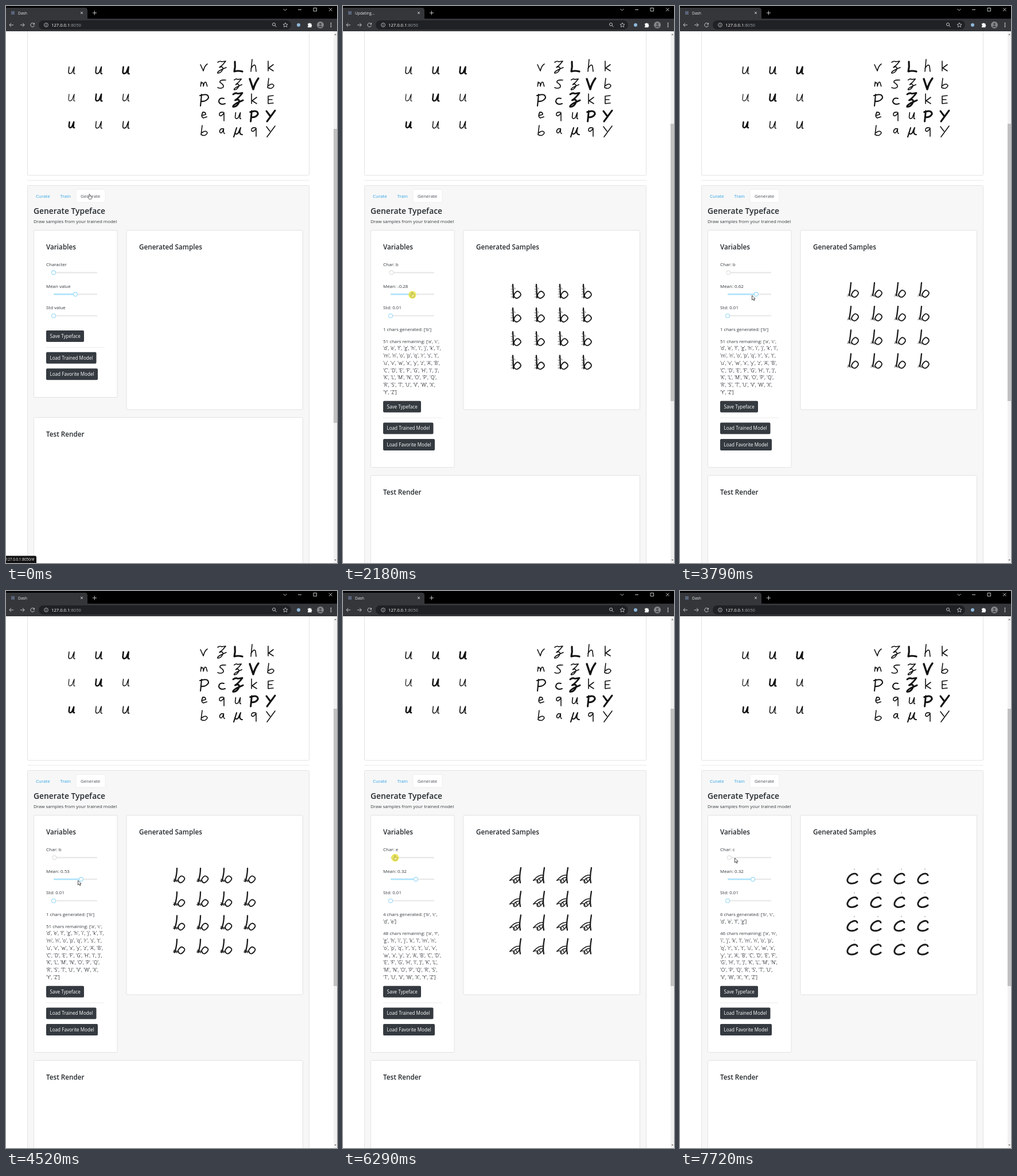
Animation, 577 px wide and 970 px high, one loop 8 s. Source, as an HTML page:

```html
<!DOCTYPE html>
<html lang="en">
<head>
<meta charset="utf-8">
<title>Generate Typeface</title>
<style>
html,body{margin:0;width:100%;height:100%;overflow:hidden;background:#fff}
svg{display:block;width:577px;height:970px;font-family:"Open Sans","Noto Sans",sans-serif}
text{font-size:7.95px;fill:#33383c;white-space:pre}
.h{font-size:11.7px;font-weight:600;fill:#24292d}
.b{font-size:8.12px;fill:#fff}
.row{font-size:8.3px}
.ink path{fill:none;stroke-linecap:round;stroke-linejoin:round}
.card{fill:#fff;stroke:#e2e2e2}
.ui{fill:none;stroke:#d4d6d9;stroke-width:.9}
</style>
</head>
<body>
<svg id="stage" viewBox="0 0 577 970"></svg>
<script>
const LOOP = 8000, LINE = 12.7;
const stage = document.getElementById('stage');
const $ = id => document.getElementById(id);
const text = (x, y, s, extra = '') => `<text x="${x}" y="${y}" ${extra}>${s}</text>`;
const rect = (x, y, w, h, extra) => `<rect x="${x}" y="${y}" width="${w}" height="${h}" ${extra}/>`;
const path = (d, extra = '') => `<path d="${d}" ${extra}/>`;
const mark = (x, y, d, w, s = 1) =>
  path(d, `transform="translate(${x} ${y}) scale(${s})" stroke="#111" stroke-width="${w / s}"`);

// Handwritten letters, drawn around their own centre
const pen = {
  v: 'M-6,-4L-1,7Q1,-2 6,-5',
  z: 'M-7,-8Q-3,-11 0,-9L7,-10Q2,-3 -4,1Q3,-2 2,4Q-1,11 -7,11Q-9,8 8,1',
  L: 'M-5,-9Q-4,0 -6,8Q0,6 8,8',
  h: 'M-3,-13L-5,8M-5,3Q1,-7 3,-1L4,8',
  k: 'M-4,-10L-4,7M5,-4L-3,2 5,7',
  m: 'M-6,4L-5,-4M-5,-1Q-1,-6 -1,4Q1,-6 4,-3L6,4',
  s: 'M7,-7Q-4,-8 -3,-3Q4,1 3,5Q-1,9 -7,6',
  V: 'M-7,-9L-1,9Q2,-2 8,-10',
  b: 'M-3,-10L-5,6Q3,10 6,3Q4,-3 -4,3',
  p: 'M-4,-9L-6,11M-7,-7Q8,-12 8,-3Q4,4 -5,3',
  c: 'M4,-2Q-5,-4 -5,4Q-2,10 6,7',
  E: 'M5,-7L-4,-6 -4,7 5,6M-4,0L3,0',
  e: 'M-4,0L3,-2Q3,-7 -2,-6Q-6,2 -1,4L5,2',
  q: 'M3,-6Q-5,-7 -4,-1Q-1,3 4,-5L4,9',
  u: 'M-4,-6L-5,3Q-4,8 1,4L5,-6L4,4Q4,6 6,6',
  a: 'M4,-5Q-5,-6 -4,2Q0,7 4,-4Q3,4 6,5',
  w: 'M-2,-6L-7,10M-5,3Q-3,7 1,3L5,-6Q1,6 8,6',
  Y: 'M-7,-8L-1,0M8,-9L-6,10'
};
const wall = ['vzLhk', 'mszVb', 'pczkE', 'equpY', 'bawqY'];
const rows = [106, 136, 163, 191, 218], cols = [345, 376, 404, 432, 461];
const bold = {'0,2': 3.2, '1,3': 3.4, '2,2': 2.8, '2,0': 2.1, '2,1': 2, '3,3': 3, '3,4': 3, '4,2': 2.1, '3,0': 1.8};
const small = {'1,0': .95, '1,2': .9, '2,2': 1.15, '3,2': .9, '3,3': .9, '4,1': .85};
function letters() {
  let s = '';
  wall.forEach((row, r) => [...row].forEach((c, i) => {
    const k = r + ',' + i;
    s += mark(cols[i], rows[r], pen[c], bold[k] || 1.6, small[k] || 1);
  }));
  [1.6, 2, 2.6, 1.2, 2.4, 1.4, 2.5, 1.5, 1.7].forEach((w, i) =>
    s += mark(114 + i % 3 * 47.3, 112 + Math.floor(i / 3) * 47.5, pen.u, w, i === 6 ? .85 : 1));
  return s;
}

function chrome() {
  return rect(0, 0, 577, 44, 'fill="#000"') +
    path('M0,22V3H138Q142,3 142,8V22Z', 'fill="#35363a"') +
    rect(0, 22, 577, 22, 'fill="#35363a"') +
    rect(57, 25, 440, 16, 'rx="8" fill="#202124"') +
    rect(9, 9, 6, 6, 'fill="#596478"') +
    text(21, 14.5, 'Dash', 'id="title" style="font-size:6.7px;fill:#e8eaed"') +
    text(79, 35.8, '127.0.0.1<tspan fill="#9aa0a6">:8050</tspan>', 'style="font-size:7.66px;fill:#fff"') +
    `<g class="ui">` +
    path('M130,10l4,4m0,-4l-4,4M151,12h7m-3.5,-3.5v7') +
    path('M483.500,5l3,3 3,-3M509,6.500h6M536,3.500h5.500v5.500h-5.500ZM563,3.500l5.500,5.500m0,-5.500l-5.500,5.500') +
    path('M13,33H6m3,-3.200l-3.200,3.200 3.200,3.200') +
    path('M25,33h7m-3,-3.200l3.200,3.200 -3.200,3.200') +
    path('M49,31A3.400,3.400 0 1 0 49.500,34M49.500,29.500v2.500h-2.500') +
    `<circle cx="70" cy="33" r="3.4" stroke-width=".8"/>` + path('M70,32.500v2.200M70,30.900v.8') +
    `<circle cx="467" cy="32" r="2.500"/>` + path('M469,34l2.500,2.500') +
    path('M487,29l1.200,2.700 2.800,.2 -2.100,1.900 .7,2.900 -2.600,-1.600 -2.600,1.600 .7,-2.900 -2.100,-1.900 2.800,-.2Z', 'stroke-width=".8"') +
    `</g><circle cx="510" cy="33" r="3" fill="#8fb9dc"/>` +
    path('M526,30.500h2a1.300,1.300 0 0 1 2.500,0h2v2.200a1.300,1.300 0 0 1 0,2.500v2h-6.500v-2a1.300,1.300 0 0 0 0,-2.500Z', 'fill="#fff"') +
    `<circle cx="548" cy="33" r="6" fill="#85878a"/><circle cx="548" cy="31.5" r="2" fill="#4a4c50"/>` +
    path('M544,37Q548,31 552,37Z', 'fill="#4a4c50"') +
    [30, 33, 36].map(y => `<circle cx="566.500" cy="${y}" r=".9" fill="#e8eaed"/>`).join('');
}

const slider = (id, y) => rect(83, y - 1.2, 76, 2.4, 'rx="1.2" fill="#e9e9e9"') +
  rect(83, y - 1.2, 0, 2.4, `id="${id}Fill" rx="1.2" fill="#abe2fb"`) +
  `<circle id="${id}Knob" cx="83" cy="${y}" r="3.4" fill="#fff" stroke="#96d8f7" stroke-width="1.1"/>`;
const button = (y, w, s) => rect(70, y, w, 20, 'rx="2" fill="#343a40"') + text(76.5, y + 13, s, 'class="b"');

stage.innerHTML = `
<defs><filter id="soft" x="-5%" y="-5%" width="110%" height="110%"><feGaussianBlur stdDeviation=".4"/></filter>
<g id="cell" class="ink"></g></defs>` +
  rect(0, 0, 577, 970, 'fill="#fff"') +
  rect(37.5, 20, 491, 275, 'rx="2" class="card"') +
  `<g class="ink">${letters()}</g><circle cx="401.500" cy="88" r=".4" fill="#999"/>` +
  rect(37, 303, 492, 1, 'fill="#ebebeb"') +
  rect(37.5, 312.5, 491, 700, 'rx="2" fill="#f7f7f7" stroke="#e4e4e4"') +
  path('M122,342V321Q122,319.500 124,319.500H171Q173,319.500 173,321.500V342Z', 'fill="#fff" stroke="#eaeaea" stroke-width=".7"') +
  text(52, 333.5, 'Curate', 'style="fill:#2fa4e7"') + text(94.5, 333.5, 'Train', 'style="fill:#2fa4e7"') +
  text(130, 333.5, 'Generate', 'style="fill:#495057"') +
  text(48, 361.5, 'Generate Typeface', 'class="h" style="font-size:13.85px"') +
  text(48, 378, 'Draw samples from your trained model') +
  rect(48.5, 390.5, 145.500, 291, 'id="vars" rx="2" class="card"') +
  rect(210, 390.5, 307.500, 312.500, 'rx="2" class="card"') +
  text(70, 424, 'Variables', 'class="h"') + text(232, 424, 'Generated Samples', 'class="h"') +
  text(70, 453, '', 'id="charText"') + slider('char', 464.3) +
  text(70, 490.6, '', 'id="meanText"') + slider('mean', 502) +
  text(70, 528, '', 'id="stdText"') + slider('std', 539.4) +
  `<g id="lists"></g><g id="actions">` + button(565, 66, 'Save Typeface') + rect(70, 594, 102, 1, 'fill="#ececec"') +
  button(602.7, 87.5, 'Load Trained Model') + button(631.3, 90, 'Load Favorite Model') + `</g>
  <g id="test">` + rect(48.5, .5, 469, 400, 'rx="2" class="card"') + text(70, 34, 'Test Render', 'class="h"') + `</g>
  <g id="grid" filter="url(#soft)">` +
  Array.from({length: 16}, (_, i) => `<use href="#cell" x="${301 + i % 4 * 41}" y="${499 + (i >> 2) * 41.2}"/>`).join('') + `</g>` +
  rect(571, 43, 6, 927, 'fill="#f1f1f1"') + rect(571, 214, 6, 512, 'id="thumb" fill="#c1c1c1"') +
  path('M572.500,50.500l1.700,-2 1.700,2ZM572.500,964l1.700,2 1.700,-2Z', 'fill="#555"') +
  `<g id="status">` + path('M0,957.500H51Q53,957.500 53,960V970H0Z', 'fill="#111"') +
  text(-.5, 966.3, '127.0.0.1:8050/#', 'style="font-size:6.4px;fill:#fff"') + `</g>` +
  chrome() +
  `<g id="pointer"><circle id="glow" r="6.7" fill="#e6e032" opacity=".75"/>` +
  path('M0,0V8L1.900,6.300 3.200,9 4.500,8.400 3.300,5.800H5.700Z', 'id="arrow" fill="#fff" stroke="#222" stroke-width=".8"') +
  path('M-1.200,-4Q0,-5 .5,-3.800V-1.200L3.300,-.5Q4,0 3.600,2L2.600,4.300H-1.300L-3.300,1Q-3,0 -1.200,1Z', 'id="hand" stroke-width=".8"') +
  `</g>`;

// Piecewise linear track: rows of [time, value, value...]
function track(keys, t) {
  let i = 0;
  while (i < keys.length - 1 && keys[i + 1][0] <= t) i++;
  const a = keys[i], b = keys[i + 1] || a;
  const k = b === a ? 0 : Math.max(0, (t - a[0]) / (b[0] - a[0]));
  return a.slice(1).map((v, j) => v + (b[j + 1] - v) * k);
}
const held = (steps, t) => steps.reduce((v, s) => t >= s[0] ? s[1] : v, steps[0][1]);

const meanKeys = [[1140, 0], [1470, -.11], [1570, -.2], [1910, -.62], [1970, -.62], [2480, .86],
  [2580, .75], [2670, .62], [3140, .62], [3480, .67], [3680, .62], [3850, .62], [3920, .61],
  [4050, .61], [5030, .43], [5150, .43], [5670, .32]];
const charSteps = [[0, 0], [690, 1], [5940, 2], [6040, 3], [6230, 4], [6640, 5], [6900, 6],
  [7360, 5], [7500, 4], [7570, 3], [7720, 2]];
const busy = [[1500, 1640], [2050, 2190], [4290, 4430], [5260, 5400], [5670, 5740], [7430, 7500]];
const meanX = m => 83 + (m + 2) * 19;
const charX = i => 83 + i * 1.47;

// Stem (start, bend, end) and bowl (left, top, right, bottom) of the letter at each mean
const shapes = [
  [-.7, -5, -14, -4, 0, -4, 9, -3, 5, 3, -3, 9, 3, 2, 10],
  [-.11, -5, -14, -4, 0, -4, 9, -3, 5, 3, -2, 9, 4, 2, 10],
  [.43, -3, -15, -2, -4, -8, 9, 0, 5, 5, -1, 11, 3, 4, 10],
  [.62, -3, -17, -4, -5, -6, 5, -2, 4, 4, -4, 10, 1, 4, 8],
  [.76, -5, -18, -3, -8, -9, 4, -8, 6, 3, 0, 11, 3, 3, 8]
];
function ring(p) {
  const at = i => p[(i + 4) % 4];
  let d = `M${p[0]}`;
  for (let i = 0; i < 4; i++) {
    const [a, b, c, e] = [at(i - 1), at(i), at(i + 1), at(i + 2)];
    d += `C${b[0] + (c[0] - a[0]) / 5},${b[1] + (c[1] - a[1]) / 5} ${c[0] - (e[0] - b[0]) / 5},${c[1] - (e[1] - b[1]) / 5} ${c}`;
  }
  return d + 'Z';
}
const ink = (d, w, o = 1) => path(d, `stroke="#1c1c1c" stroke-width="${w}" opacity="${o}"`);
function drawB(m) {
  const v = track(shapes, m), p = i => [v[i], v[i + 1]];
  const fuzz = Math.max(0, Math.min(1, (.35 - m) * 3));
  const foot = Math.max(0, 1 - Math.abs(m - .52) / .2);
  let s = ink(`M${p(0)}Q${p(2)} ${p(4)}`, 2.3) + ink(ring([p(6), p(8), p(10), p(12)]), 1.9);
  if (fuzz) s += ink('M-7,-11l2,1M-8,-6l4,1M-7,-2l2,2M-8,3l4,-1M-8,8l4,-1M-2,-8l1,2', 1.2, fuzz * .55);
  if (foot) s += ink('M-9,6Q-5,3 0,6M-8,3L-3,7', 2, foot * .8);
  return s;
}
const glyphs = {
  c: ink('M8,-4C6,-10 -6,-6 -9,3C-11,12 2,12 8,7', 2.9) + ink('M3,-15v1', 1, .6),
  d: ink('M9,-17C7,-6 6,2 8,9', 2.3) + ink('M-10,5C-5,-1 0,-5 7,-4M7,0C1,-1 -6,5 -3,9C1,11 6,5 7,0', 1.5) + ink('M-10,5Q-4,2 -2,7M0,2l2,4', 2, .75),
  e: ink('M-8,4Q4,3 7,-3C5,-10 -6,-6 -8,3C-9,12 4,11 9,6', 2.5),
  f: ink('M8,-14C1,-18 -2,-8 -2,12M-8,-2H7', 2.4),
  g: ink('M6,-7C-3,-11 -10,-3 -7,2C-2,6 5,0 6,-7L5,9C2,16 -6,13 -7,10', 2.3)
};

const abc = 'abcdefghijklmnopqrstuvwxyz', all = abc + abc.toUpperCase();
const quote = s => [...s].map(c => `'${c}'`).join(', ');
function lists(n) {
  const made = all.slice(1, n + 1), left = 'a' + all.slice(n + 1);
  const out = [];
  const head = `${n} chars generated: [`;
  let y = 565.8;
  const put = (s, extra) => { out.push(text(70, y, s, extra)); y += LINE; };
  if (n < 3) put(head + quote(made) + ']');
  else { put(head + quote(made.slice(0, 2)) + ','); put(quote(made.slice(2)) + ']', 'class="row"'); }
  y += 8.2;
  let i = 0;
  for (const size of [2, n === 1 ? 9 : 8, 8, 8, 8, 7, 7, 7]) {
    if (i >= left.length) break;
    const part = quote(left.slice(i, i + size)) + (i + size >= left.length ? ']' : ',');
    if (i) put(part, 'class="row"');
    else put(`${left.length} chars remaining: [` + part);
    i += size;
  }
  return {html: out.join(''), extra: out.length - 9};
}

const pointerKeys = [[0, 146, 332], [130, 146, 332], [270, 86, 465], [1070, 86, 465], [1140, 121, 503]];
const set = (id, o) => { for (const k in o) $(id).setAttribute(k, o[k]); };
const show = (id, on) => set(id, {visibility: on ? 'visible' : 'hidden'});
const say = (id, s) => { if ($(id).textContent !== s) $(id).textContent = s; };
const cache = {};
function fill(id, html) { if (cache[id] !== html) $(id).innerHTML = cache[id] = html; }
function knob(id, x, color) {
  set(id + 'Knob', {cx: x, stroke: color});
  set(id + 'Fill', {width: x - 83, fill: color === '#ddd' ? '#ddd' : '#abe2fb'});
}

function draw(t) {
  const ready = t >= 690;
  const idx = held(charSteps, t), mean = track(meanKeys, t)[0];
  const lagMean = track(meanKeys, t - (t < 3000 ? 95 : 30))[0];
  const count = Math.max(1, ...charSteps.filter(s => s[0] <= t).map(s => s[1]));

  say('title', busy.some(([a, b]) => t >= a && t < b) ? 'Updating...' : 'Dash');
  show('status', t < 130);
  say('charText', ready ? 'Char: ' + all[idx] : 'Character');
  say('meanText', ready ? 'Mean: ' + lagMean.toFixed(2) : 'Mean value');
  say('stdText', ready ? 'Std: 0.01' : 'Std value');
  knob('char', charX(idx), ready ? '#ddd' : '#96d8f7');
  knob('mean', meanX(mean), '#96d8f7');
  knob('std', 83, '#96d8f7');

  const list = ready ? lists(count) : {html: '', extra: 0};
  const grow = list.extra * LINE;
  fill('lists', list.html);
  set('vars', {height: ready ? 413 + grow : 291});
  set('actions', {transform: `translate(0 ${ready ? 122.7 + grow : 0})`});
  set('test', {transform: `translate(0 ${ready ? 817 + grow : 716})`});
  set('thumb', {y: ready ? 205 - list.extra * 1.2 : 214, height: ready ? 483 - list.extra * 3.5 : 512});

  show('grid', ready);
  const shown = all[Math.max(1, held(charSteps, t < 7300 ? t - 90 : t))];
  fill('cell', shown === 'b' ? drawB(lagMean) : glyphs[shown]);

  let [x, y] = track(pointerKeys, t);
  const drag = t >= 1140 && t < 2800, pick = t >= 5940 && t < 7230;
  if (drag) [x, y] = [meanX(mean), 503];
  else if (pick) [x, y] = [charX(idx) + 2, 464.5];
  else if (t >= 7230) [x, y] = [95.5, 465];
  else if (t >= 2800) [x, y] = [125.5, 504];
  const arrow = !pick && t >= 2800, glow = drag || pick;
  set('pointer', {transform: `translate(${x} ${y})`});
  show('glow', glow);
  show('arrow', arrow);
  show('hand', !arrow);
  set('hand', {fill: glow ? '#efeb8a' : '#fff', stroke: glow ? '#a8a030' : '#444'});
}

(function tick() {
  draw(performance.now() % LOOP);
  requestAnimationFrame(tick);
})();
</script>
</body>
</html>
```
